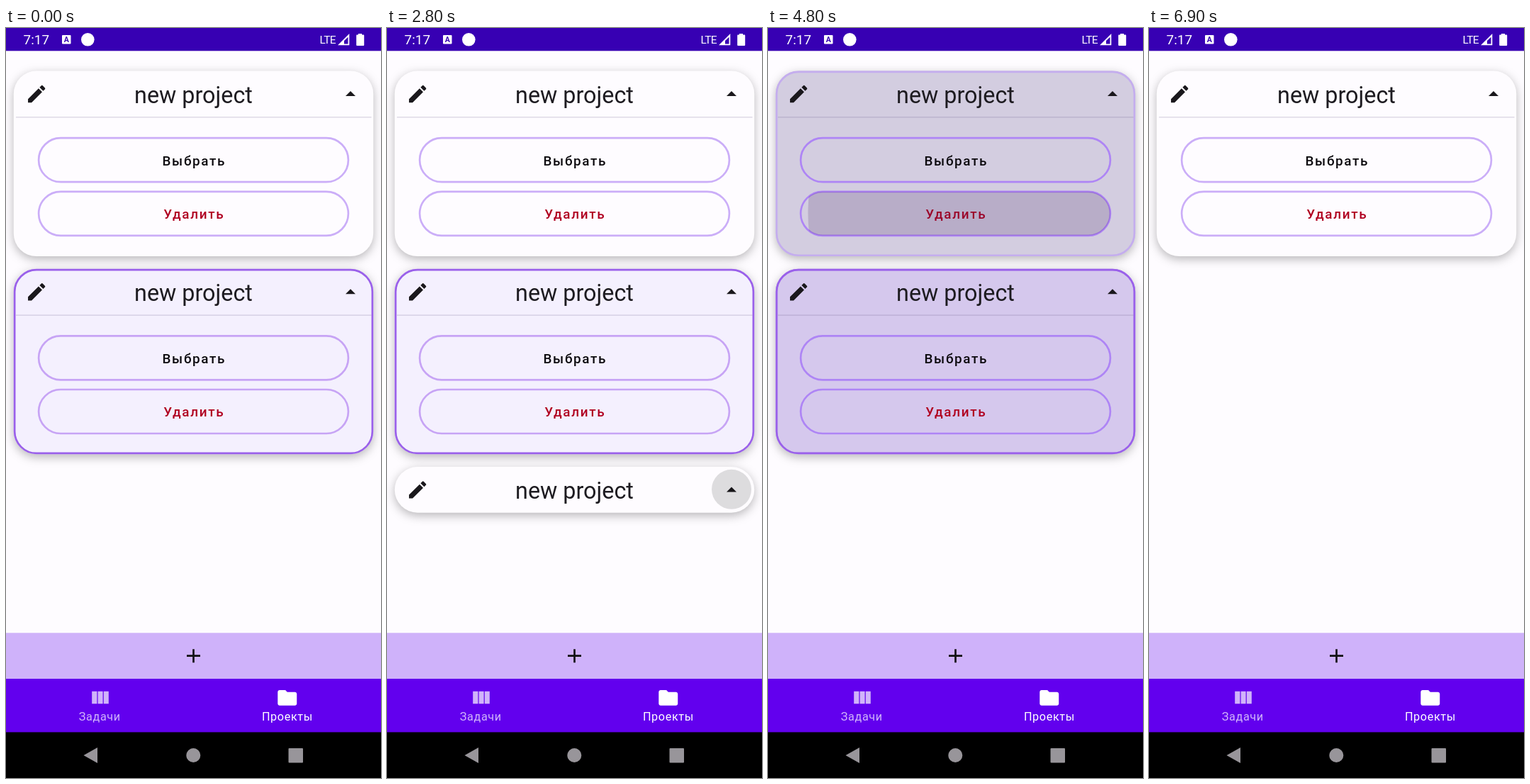
Animation of 529 by 1058 pixels, one loop 7.1 s. Source, as an HTML page:

```html
<!DOCTYPE html>
<html lang="ru">
<head>
<meta charset="utf-8">
<title>Проекты</title>
<style>
  html, body { margin: 0; width: 100%; height: 100%; overflow: hidden; background: #fefcff; }
  svg { display: block; width: 100vw; height: 100vh; font-family: Roboto, sans-serif; }
  text { text-anchor: middle; }
  .title { font-size: 32.3px; fill: #1d1b20; }
  .button { fill: none; stroke-width: 2.7; }
  .action { font-size: 18.86px; font-weight: 500; letter-spacing: .0893em; }
  .label { font-size: 16.16px; letter-spacing: .04em; }
  .shadow { filter: drop-shadow(0 4px 7px rgba(0, 0, 0, .28)); }
</style>
</head>
<body>
<svg viewBox="0 0 529 1058" preserveAspectRatio="none">
  <defs>
    <clipPath id="deleteClip"><rect x="46" y="170.2" width="437" height="62" rx="31"/></clipPath>
    <g id="header">
      <path transform="translate(27 16.3) scale(1.347)" fill="#1a181c" d="M3 17.25V21h3.75L17.81 9.94l-3.75-3.75L3 17.25zM20.71 7.04c.39-.39.39-1.02 0-1.41l-2.34-2.34a.996.996 0 0 0-1.41 0l-1.83 1.83 3.75 3.75 1.83-1.83z"/>
      <text class="title" x="264.5" y="45">new project</text>
      <path d="M479 35.5l7-7 7 7z" fill="#1a181c"/>
    </g>
  </defs>

  <rect width="529" height="1058" fill="#fefcff"/>
  <g id="list"></g>

  <rect width="529" height="32.3" fill="#3700b3"/>
  <g fill="#fff">
    <text x="42.8" y="23.3" font-size="18.86">7:17</text>
    <rect x="79" y="10" width="12.5" height="12.5" rx="1"/>
    <text x="85.2" y="20" font-size="10.5" font-weight="700" style="fill:#3700b3">A</text>
    <circle cx="115.3" cy="16.3" r="9.3"/>
    <text x="453.7" y="22" font-size="15.5" letter-spacing="-.7">LTE</text>
    <path d="M468 24.3L484.3 8v16.3zM477 22.5h5.5V12.7L477 18z" fill-rule="evenodd"/>
    <path d="M497 9.5V8h5v1.5h2.2q1 0 1 1V24q0 1-1 1h-9q-1 0-1-1V10.500q0-1 1-1z"/>
  </g>

  <rect y="853.3" width="529" height="65" fill="#cfb2fa"/>
  <path d="M255 885.7h19M264.500 876.200v19" stroke="#111" stroke-width="2.7"/>

  <rect y="918" width="529" height="76" fill="#6200ee"/>
  <g fill="#d0b3fa">
    <path d="M121.200 935.700h7.200v17.500h-7.200zM129.600 935.700h7v17.500h-7zM137.800 935.700h7v17.500h-7z"/>
    <text class="label" x="132.300" y="977.300">Задачи</text>
  </g>
  <g fill="#fff">
    <path transform="translate(380.6 928.700) scale(1.347)" d="M10 4H4c-1.100 0-2 .9-2 2v12c0 1.100.9 2 2 2h16c1.100 0 2-.9 2-2V8c0-1.100-.9-2-2-2h-8z"/>
    <text class="label" x="396.900" y="977.300">Проекты</text>
  </g>

  <rect y="993.400" width="529" height="65"/>
  <g fill="#98959a">
    <path d="M109.500 1026L129 1015v22z"/>
    <circle cx="264.300" cy="1026" r="10"/>
    <rect x="398.500" y="1016" width="20.500" height="20.500" rx="1"/>
  </g>
</svg>

<script>
const LOOP = 7100, PITCH = 279.2, OPEN = 261.5, CLOSED = 64.7;
const list = document.getElementById('list');

const box = (attrs, inset = 0) =>
  `<rect class="box" x="${10.8 + inset}" y="${inset}" width="${507.4 - 2 * inset}" height="${OPEN - 2 * inset}" rx="${32.3 - inset}" ${attrs}/>`;

const button = (y, label, color, cls = '') => `
  <rect class="button ${cls}" x="46.1" y="${y}" width="436.8" height="62" rx="31"/>
  <text class="action" x="265.3" y="${y + 38.4}" fill="${color}">${label}</text>`;

function makeCard(index, selected) {
  const card = document.createElementNS('http://www.w3.org/2000/svg', 'g');
  card.setAttribute('transform', `translate(0 ${60.6 + index * PITCH})`);
  const border = selected
    ? box('fill="none" stroke="#9a60ea" stroke-width="2.7"', 1.35) : '';
  card.innerHTML = `
    ${box(`fill="${selected ? '#f4f0fe' : '#fefcff'}"`).replace('"box"', '"box shadow"')}
    <g class="pressed">
      ${box(`fill="${selected ? 'rgba(90,40,170,.2)' : 'rgba(40,16,100,.2)'}"`)}
      ${box('fill="none" stroke="#c4adee" stroke-width="2.7"', 1.35)}
    </g>
    ${border}
    <use href="#header"/>
    <g class="body">
      <path d="M14 65.300h501.500" stroke="#5a4a78" stroke-opacity=".23" stroke-width="1.3"/>
      ${button(94.6, 'Выбрать', '#0c0a0e')}
      ${button(170.2, 'Удалить', '#b00020', 'delete')}
    </g>
    <circle class="ripple" fill="#3c1e5a" fill-opacity=".18" clip-path="url(#deleteClip)" cx="315" cy="201"/>
    <circle class="touch" fill="#000" fill-opacity=".13" cx="486" cy="31.800"/>`;
  list.append(card);
  return card;
}

const cards = [makeCard(0, false), makeCard(1, true), makeCard(2, false)];
const [first, second, third] = cards;

const ramp = (t, from, to) => Math.min(1, Math.max(0, (t - from) / (to - from)));
const easeOut = x => 1 - (1 - x) ** 2;
const mix = (a, b, k) => `rgb(${a.map((v, i) => v + (b[i] - v) * k)})`;
const show = (el, visible) => el.style.display = visible ? '' : 'none';
const set = (card, selector, attr, value) =>
  card.querySelectorAll(selector).forEach(el => el.setAttribute(attr, value));

function render(t) {
  show(second, t < 5750);
  show(third, t >= 2450 && t < 4750);
  third.style.opacity = ramp(t, 2440, 2560);

  const open = t >= 2850;
  show(third.querySelector('.body'), open);
  set(third, '.shadow', 'height', open ? OPEN : CLOSED);
  const touch = ramp(t, 2650, 2790);
  set(third, '.touch', 'r', 28 * easeOut(touch));
  set(third, '.touch', 'opacity', touch ? 1 - ramp(t, 2900, 3150) : 0);

  const start = t < 5550 ? 4550 : 5550;
  const fade = 1 - ramp(t, start + 400, start + 700);
  const press = ramp(t, start, start + 100) * fade;
  for (const card of cards) {
    set(card, '.pressed', 'opacity', press);
    set(card, '.button', 'stroke', mix(card === second ? [199, 164, 245] : [203, 174, 248], [174, 133, 245], press));
  }
  set(first, '.delete', 'stroke', mix([203, 174, 248], [174, 133, 245], press));
  set(first, '.ripple', 'r', 281 * easeOut(ramp(t, start, start + 350)));
  set(first, '.ripple', 'opacity', fade);
}

function frame(now) {
  render(now % LOOP);
  requestAnimationFrame(frame);
}
render(0);
requestAnimationFrame(frame);
</script>
</body>
</html>
```
